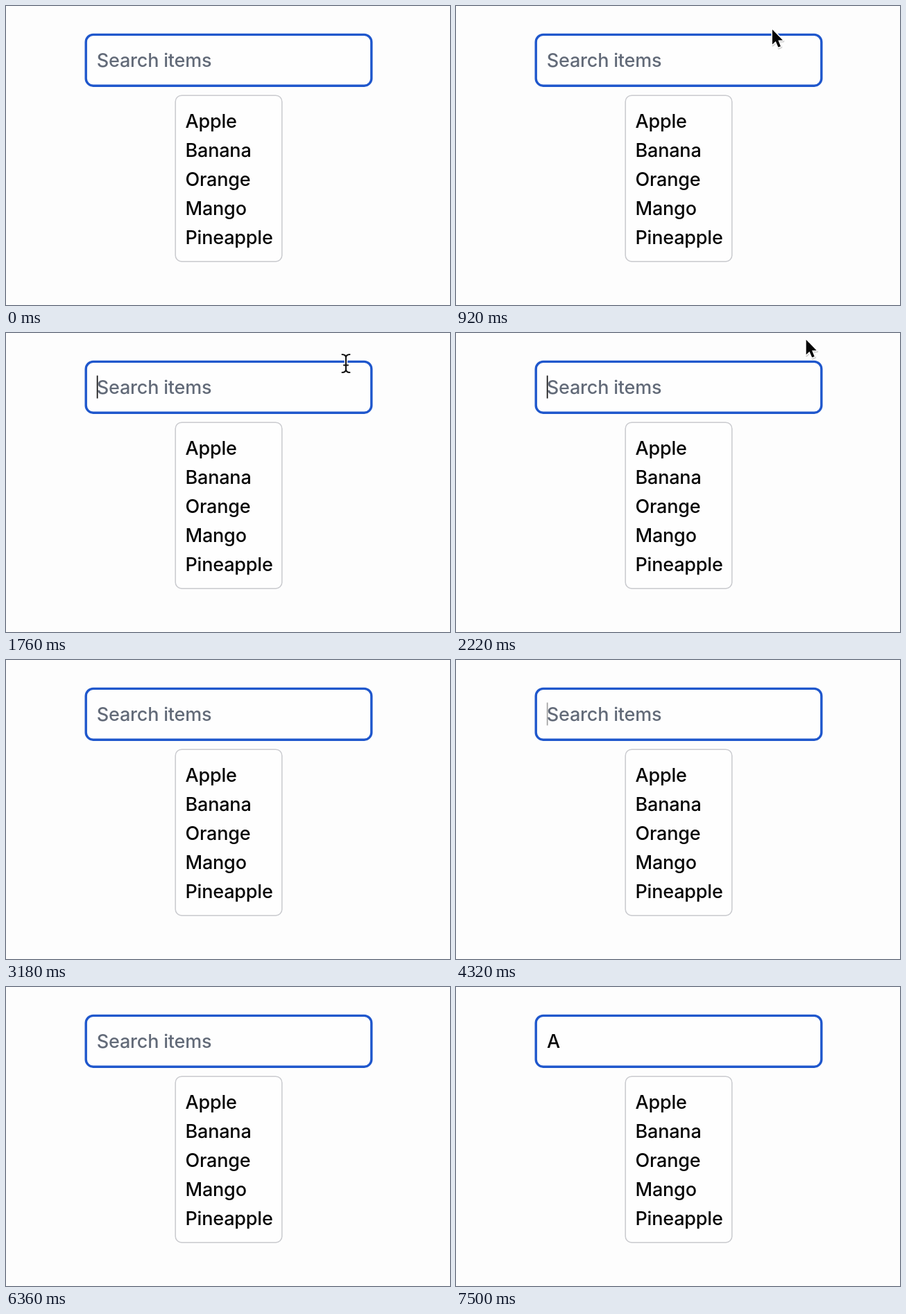
An HTML page for the animation above (8000 ms loop, 640 by 432 pixels).

```html
<!DOCTYPE html>
<html lang="en">
<head>
<meta charset="utf-8">
<title>Search list</title>
<style>
  html, body { margin: 0; width: 100%; height: 100%; overflow: hidden; background: #fdfdfd; }
  svg { display: block; width: 100vw; height: 100vh; }
  text { font: 450 27px Inter, "Liberation Sans", sans-serif; letter-spacing: -.2px; fill: #050505; }
  #hint { fill: #626a78; }
</style>
</head>
<body>
<svg viewBox="0 0 640 432">
  <defs>
    <path id="tip" d="M0 0V21.5L4.8 17L8.5 25.6L12 24.2L8.4 15.6H15Z" stroke-width="3" stroke-linejoin="round"/>
    <path id="bar" d="M-5.5 -13Q0 -13 0 -8Q0 -13 5.5 -13M0 -8V8M-5.5 13Q0 13 0 8Q0 13 5.5 13M-3 2.5H3"/>
  </defs>
  <rect x="115.2" y="41.4" width="411.6" height="73.8" rx="10.5" fill="#fefefe" stroke="#1f57cc" stroke-width="3.4"/>
  <text id="hint" x="130.8" y="87.8">Search items</text>
  <text id="typed" x="131" y="87.8">A</text>
  <rect id="caret" y="61.5" width="1.7" height="33" fill="#111"/>
  <rect x="244.2" y="129.2" width="153.6" height="240" rx="9" fill="#fefefe" stroke="#c9cace" stroke-width="1.5"/>
  <g id="list"></g>
  <g id="arrow">
    <use href="#tip" x=".8" y="1.5" stroke="#000" opacity=".18"/>
    <use href="#tip" fill="#050505" stroke="#fff" paint-order="stroke"/>
  </g>
  <g id="beam" fill="none" stroke-linecap="round">
    <use href="#bar" stroke="#fff" stroke-width="4.5"/>
    <use href="#bar" stroke="#111" stroke-width="2"/>
  </g>
</svg>
<script>
const LOOP = 8000, TYPED_AT = 6760, FADE = 440;
const LEG = 840, REST = 100, LEG_START = 80;
const stops = [[424, 66], [456, 34], [490, 44], [520, -26]];

const el = id => document.getElementById(id);
const [hint, typed, caret, arrow, beam] = ["hint", "typed", "caret", "arrow", "beam"].map(el);

el("list").innerHTML = ["Apple", "Banana", "Orange", "Mango", "Pineapple"]
  .map((name, i) => `<text x="258.5" y="${175.5 + 42 * i}">${name}</text>`).join("");

const ramp = (t, from, span) => Math.min(1, Math.max(0, (t - from) / span));

// The caret fades in and out steadily; typing turns it fully on again
function caretOpacity(t) {
  if (t >= TYPED_AT) return 1 - ramp(t, TYPED_AT + 300, FADE);
  const u = (t - 1220) % 2930;
  return ramp(u, 0, FADE) - ramp(u, 1300, FADE);
}

// The pointer makes evenly timed legs with a short rest after each
function pointer(t) {
  const u = t - LEG_START, i = Math.floor(u / LEG);
  if (i < 0 || i >= stops.length - 1) return null;
  const k = ramp(u - i * LEG, 0, LEG - REST) ** 1.5;
  return stops[i].map((v, j) => v + (stops[i + 1][j] - v) * k);
}

function show(node, on) {
  node.style.display = on ? "" : "none";
}

function draw(t) {
  const hasText = t >= TYPED_AT;
  show(hint, !hasText);
  show(typed, hasText);
  caret.setAttribute("x", hasText ? 149.5 : 130.8);
  caret.setAttribute("opacity", caretOpacity(t));

  const p = pointer(t);
  const inField = p && p[1] >= 39.5;
  show(arrow, p && !inField);
  show(beam, inField);
  if (p) (inField ? beam : arrow).setAttribute("transform", `translate(${p})`);
}

let start;
function tick(now) {
  start ??= now;
  draw((now - start) % LOOP);
  requestAnimationFrame(tick);
}
draw(0);
requestAnimationFrame(tick);
</script>
</body>
</html>
```
